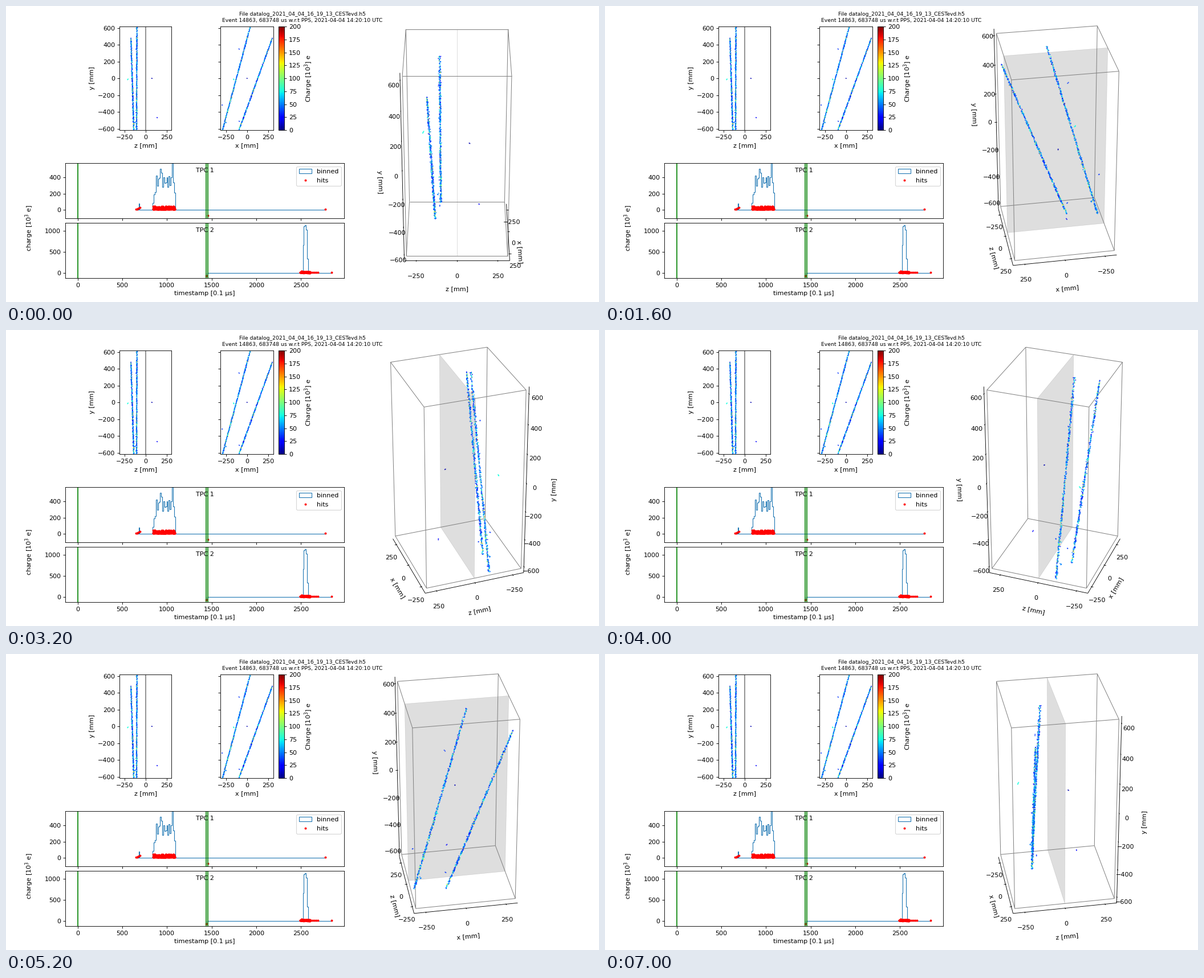
Animation, 1040 px wide and 520 px high, one loop 7200 ms. Source, as a matplotlib script:

```python
import numpy as np
import matplotlib.pyplot as plt
from itertools import product
from matplotlib.animation import FuncAnimation
from matplotlib.collections import LineCollection
from matplotlib.lines import Line2D
from matplotlib.patches import Patch, Polygon

W, H, DPI = 1040, 520, 80
FRAMES, INTERVAL = 36, 200
plt.rcParams.update({"font.family": "DejaVu Sans", "font.size": 10})
rng = np.random.default_rng(7)
fig = plt.figure(figsize=(W / DPI, H / DPI), dpi=DPI, facecolor="white")


def panel(left, top, right, bottom, **kw):
    """Axes placed by pixel edges, measured from the top left."""
    nudge = 0.1  # keeps the edges clear of a rounding tie
    return fig.add_axes([(left + nudge) / W, 1 - (bottom + nudge) / H,
                         (right - left) / W, (bottom - top) / H], **kw)


# ---------- hits ----------
PITCH = 4.434


def track(start, end, n=520):
    t = np.sort(rng.random(n))[:, None]
    p = start + t * np.subtract(end, start)
    p += rng.normal(0, [2.2, 1.5, 3], p.shape)
    p[:, :2] = np.round(p[:, :2] / PITCH) * PITCH
    return p, 12 + rng.gamma(2.6, 16, n)


def stray(x, y, z, q, n=2):
    return rng.normal((x, y, z), 2.5, (n, 3)), np.full(n, q)


groups = [
    track((302, 480, -172), (-93, -612, -139)),
    track((37, 608, -101), (-290, -614, -105)),
    stray(0, 0, 77, 8),
    stray(-42, -468, 139, 25),
    stray(-155, -13, -207, 75, 4),
    stray(-95, 350, -109, 35),
    stray(-292, -316, -108, 35),
    stray(-95, -512, -110, 35),
    stray(-250, -525, -123, 50, 4),
]
hits, charge = (np.concatenate(part) for part in zip(*groups))
dots = dict(c=charge, cmap="jet", vmin=0, vmax=200, linewidths=0)

# ---------- projections ----------
fig.text(520 / W, 1 - 20 / H, "File datalog_2021_04_04_16_19_13_CESTevd.h5\n"
         "Event 14863, 683748 us w.r.t PPS, 2021-04-04 14:20:10 UTC",
         ha="center", va="center", fontsize="small")

zy = panel(199, 36, 290, 218, xlim=(-308, 308), ylim=(-617, 617))
zy.scatter(hits[:, 2], hits[:, 1], s=2, **dots)
zy.axvline(0, color="grey", lw=1.5)
zy.set(xlabel="z [mm]", ylabel="y [mm]")
xy = panel(376, 36, 469, 218, xlim=(-315, 315), ylim=(-617, 617))
points = xy.scatter(hits[:, 0], hits[:, 1], s=2, **dots)
xy.set(xlabel="x [mm]")
for ax in (zy, xy):
    ax.set_xticks([-250, 0, 250])
    ax.set_yticks(range(-600, 601, 200))
xy.tick_params(labelleft=False)
bar = fig.colorbar(points, cax=panel(478, 36, 488, 218), ticks=range(0, 201, 25))
bar.set_label("Charge [$10^3$] e")

# ---------- time charts ----------
BIN = 12


def time_chart(top, bottom, ylim, title, bumps, span, groups):
    """Binned curve from (start, heights) bumps, and hits from (times, charges) groups."""
    ax = panel(104, top, 593, bottom, xlim=(-137, 2985), ylim=ylim)
    edges, levels = [span[0]], []
    for start, heights in bumps:
        edges += [start + i * BIN for i in range(len(heights) + 1)]
        levels += [0, *heights]
    ax.stairs(levels + [0], edges + [span[1]], color="C0", lw=1, baseline=None)
    for times, charges in groups:
        ax.plot(times, charges, "r.", ms=5)
    ax.text(0.5, 1 - 13 / (bottom - top), title, transform=ax.transAxes, ha="center", va="center")
    for x in (0, 1437, 1456):
        ax.axvline(x, color="g", lw=1.5)
    return ax


def cluster(start, end, n, top):
    return rng.uniform(start, end, n), np.clip(5 + rng.gamma(2, 7, n), 5, top)


i = np.arange(21)
ramp = np.minimum(1, np.minimum((i + 1) / 4, (21 - i) / 2))
plateau = ramp * (350 + 70 * np.sin(2.6 * i)) + 200 * np.cos(np.pi * (i - 7) / 11) ** 40
tpc1 = time_chart(276, 373, (-105, 575), "TPC 1", [(683, [80]), (840, plateau)], (655, 2771),
                  [(np.linspace(652, 700, 5), np.linspace(5, 28, 5)),
                   cluster(845, 1088, 230, 46), ([1456, 2771], [-70, 6])])
tpc1.set_yticks([0, 200, 400])
tpc1.legend(handles=[Patch(facecolor="none", edgecolor="C0", label="binned"),
                     Line2D([], [], color="r", marker=".", ms=5, ls="", label="hits")],
            loc="upper right")

peak = 1130 * np.exp(-((np.arange(7) - 2.8) / 2.1) ** 4)
tpc2 = time_chart(381, 478, (-121, 1181), "TPC 2", [(1437, [-60]), (2510, peak)], (1437, 2842),
                  [cluster(2492, 2600, 90, 62), (np.linspace(2612, 2690, 5), [18] * 5),
                   ([1437, 2842], [-70, 10])])
tpc2.set_yticks([0, 500, 1000])
tpc2.set_xlabel("timestamp [0.1 µs]")
fig.text(40.5 / W, 1 - 390 / H, "charge [$10^3$ e]", rotation=90, ha="center", va="center")

# ---------- rotating view ----------
CX, CY, HALF, DIST = 791, 241, 89.2, 26.78
SIN, COS = np.sin(np.pi / 6), np.cos(np.pi / 6)
EDGE, TICK_TEXT = 1 + 1 / 24, 1.157
TICK_IN, TICK_OUT = EDGE - 0.1 / 6, EDGE + 0.2 / 6
AXES = {  # half range, tick values, distance of the name
    "x": (310, (-250, 0, 250), 1.293),
    "z": (310, (-250, 0, 250), 1.293),
    "y": (620, range(-600, 601, 200), 1.448),
}

view = fig.add_axes([0, 0, 1, 1], xlim=(0, W), ylim=(H, 0))
view.axis("off")
glass = (0.5, 0.5, 0.5, 0.26)
plane = view.add_patch(Polygon([(0, 0)] * 4, facecolor=glass, edgecolor=glass, lw=0.6, zorder=1))
frame_lines = view.add_collection(LineCollection([], colors="grey", linewidths=0.9, zorder=2))
axis_lines = view.add_collection(LineCollection([], colors="black", linewidths=0.8, zorder=2))
cloud = view.scatter(hits[:, 0], hits[:, 1], s=3.2, alpha=0.8, zorder=3, **dots)
tick_texts = {(n, v): view.text(0, 0, str(v).replace("-", "\u2212"), ha="center", va="top")
              for n, (_, values, _) in AXES.items() for v in values}
names = {n: view.text(0, 0, f"{n} [mm]", ha="center", va="center", rotation_mode="anchor")
         for n in AXES}

corners = list(product((-1, 1), repeat=3))
box_edges = [(p, q) for p, q in product(corners, corners)
             if p < q and sum(a != b for a, b in zip(p, q)) == 1]
unit_hits = hits[:, [0, 2, 1]] / (310, 310, 620)


def project(p, azim):
    """Unit box coordinates (x, z, y) to stage pixels."""
    x, z, y = np.moveaxis(np.asarray(p, float), -1, 0)
    c, s = np.cos(azim), np.sin(azim)
    front, right = x * c + z * s, z * c - x * s
    scale = HALF / (1 - (front * COS + 2 * y * SIN) / DIST)
    return np.stack([CX + right * scale, CY - (2 * y * COS - front * SIN) * scale], -1)


def place(name, t, k, near_x, near_z, tip=None):
    """Point at t along an axis, pushed out to k; tip moves it along its tick."""
    tip = k if tip is None else tip
    return {"x": (t, near_z * tip, -k),
            "z": (near_x * tip, t, -k),
            "y": (near_x * tip, -near_z * k, t)}[name]


def update(step):
    azim = 2 * np.pi * step / FRAMES
    near = (1 if np.cos(azim) >= 0 else -1, 1 if np.sin(azim) >= 0 else -1)
    plane.set_xy(project([(-1, 0, -1), (1, 0, -1), (1, 0, 1), (-1, 0, 1)], azim))
    frame_lines.set_segments(project(box_edges, azim))
    cloud.set_offsets(project(unit_hits, azim))
    segments = []
    for name, (half, values, name_dist) in AXES.items():
        line = project([place(name, t, EDGE, *near) for t in (-EDGE, EDGE)], azim)
        segments.append(line)
        for v in values:
            t = v / half
            segments.append(project([place(name, t, EDGE, *near, tip=tip)
                                     for tip in (TICK_IN, TICK_OUT)], azim))
            tick_texts[name, v].set_position(project(place(name, t, TICK_TEXT, *near), azim))
        dx, dy = line[1] - line[0]
        angle = np.degrees(np.arctan2(-dy, dx)) % 180
        names[name].set_rotation(angle - 180 if angle > 90 else angle)
        names[name].set_position(project(place(name, 0, name_dist, *near), azim))
    axis_lines.set_segments(segments)
    return []


anim = FuncAnimation(fig, update, frames=FRAMES, interval=INTERVAL, repeat=True, repeat_delay=0)
plt.show()
```
